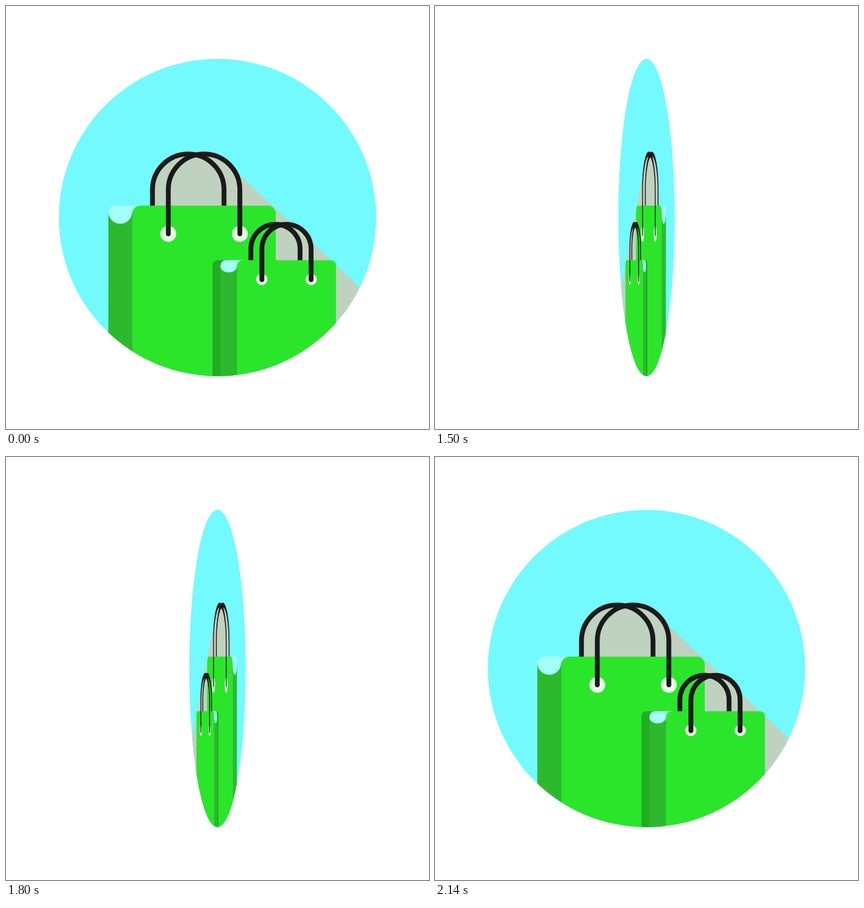
An HTML page that plays this animation: 748 by 748 pixels, repeating every 2980 ms.

```html
<!DOCTYPE html>
<html lang="en">
<head>
<meta charset="utf-8">
<title>Shopping bags</title>
<style>
  html, body { margin: 0; width: 100%; height: 100%; overflow: hidden; background: #fff; }
  svg { display: block; width: 100vw; height: 100vh; }
  .sky { fill: #72faff; }
  .shadow { fill: #bfd2c0; }
  .front { fill: #2be52b; }
  .side { fill: #2db92d; }
  .edge { fill: #22ac22; }
  .fold { fill: #a5fff6; }
  .eyelet { fill: #e6ffe6; }
  .handle { fill: none; stroke: #1a1a1a; stroke-width: 8.5; }
  .round { stroke-linecap: round; }
</style>
</head>
<body>
<svg viewBox="0 0 748 748">
  <defs>
    <clipPath id="disc"><circle cx="374" cy="374" r="280.5"/></clipPath>
  </defs>
  <g id="coin" clip-path="url(#disc)">
    <rect class="sky" x="90" y="90" width="568" height="568"/>

    <g class="shadow">
      <path d="M259 355V325a63.25 63.25 0 0 1 126.5 0V355Z"/>
      <path d="M287 355V325a63.25 63.25 0 0 1 126.5 0V355Z"/>
      <path d="M413.5 299L700 567V660H300V353H413.5Z"/>
    </g>

    <!-- large bag -->
    <path class="handle" d="M259 354V325a63.25 63.25 0 0 1 126.5 0V354"/>
    <rect class="side" x="181" y="364" width="44" height="300"/>
    <path class="fold" d="M181 364.5Q182 353 195 353H240V364.5H223a21 20.5 0 0 1 -42 0Z"/>
    <path class="front" d="M223.500 664V367a14 14 0 0 1 14 -14H463a14 14 0 0 1 14 14V664Z"/>
    <circle class="eyelet" cx="287" cy="403" r="14"/>
    <circle class="eyelet" cx="413.500" cy="403" r="14"/>
    <path class="handle round" d="M287 403V325a63.25 63.25 0 0 1 126.5 0V403"/>

    <!-- small bag -->
    <path class="handle" d="M433 450V429.500a43.5 43.5 0 0 1 87 0V450"/>
    <path class="edge" d="M365 664V458.500a9 9 0 0 1 9 -9H400V664Z"/>
    <rect class="side" x="379" y="460" width="31" height="204"/>
    <path class="fold" d="M379 460Q380 449.500 389 449.500H420V460H408.500a14.75 11 0 0 1 -29.500 0Z"/>
    <path class="front" d="M408.500 664V459.500a10 10 0 0 1 10 -10H574.500a9 9 0 0 1 9 9V664Z"/>
    <circle class="eyelet" cx="452.300" cy="483.500" r="10"/>
    <circle class="eyelet" cx="539.700" cy="483.500" r="10"/>
    <path class="handle round" d="M452.500 484V429.500a43.5 43.5 0 0 1 87 0V484"/>
  </g>
</svg>
<script>
  const LOOP = 2980, STEP = 20, START = 1158, SPIN = 984;
  const coin = document.getElementById('coin');

  // One full turn about the vertical axis, eased in and out, seen without perspective.
  function draw(now) {
    const t = Math.floor(now / STEP + 0.01) * STEP % LOOP;
    const p = Math.min(1, Math.max(0, (t - START) / SPIN));
    const width = Math.cos(2 * Math.PI * p * p * (3 - 2 * p));
    coin.setAttribute('transform', `translate(374 0) scale(${width.toFixed(5)} 1) translate(-374 0)`);
    requestAnimationFrame(draw);
  }
  draw(performance.now());
</script>
</body>
</html>
```
